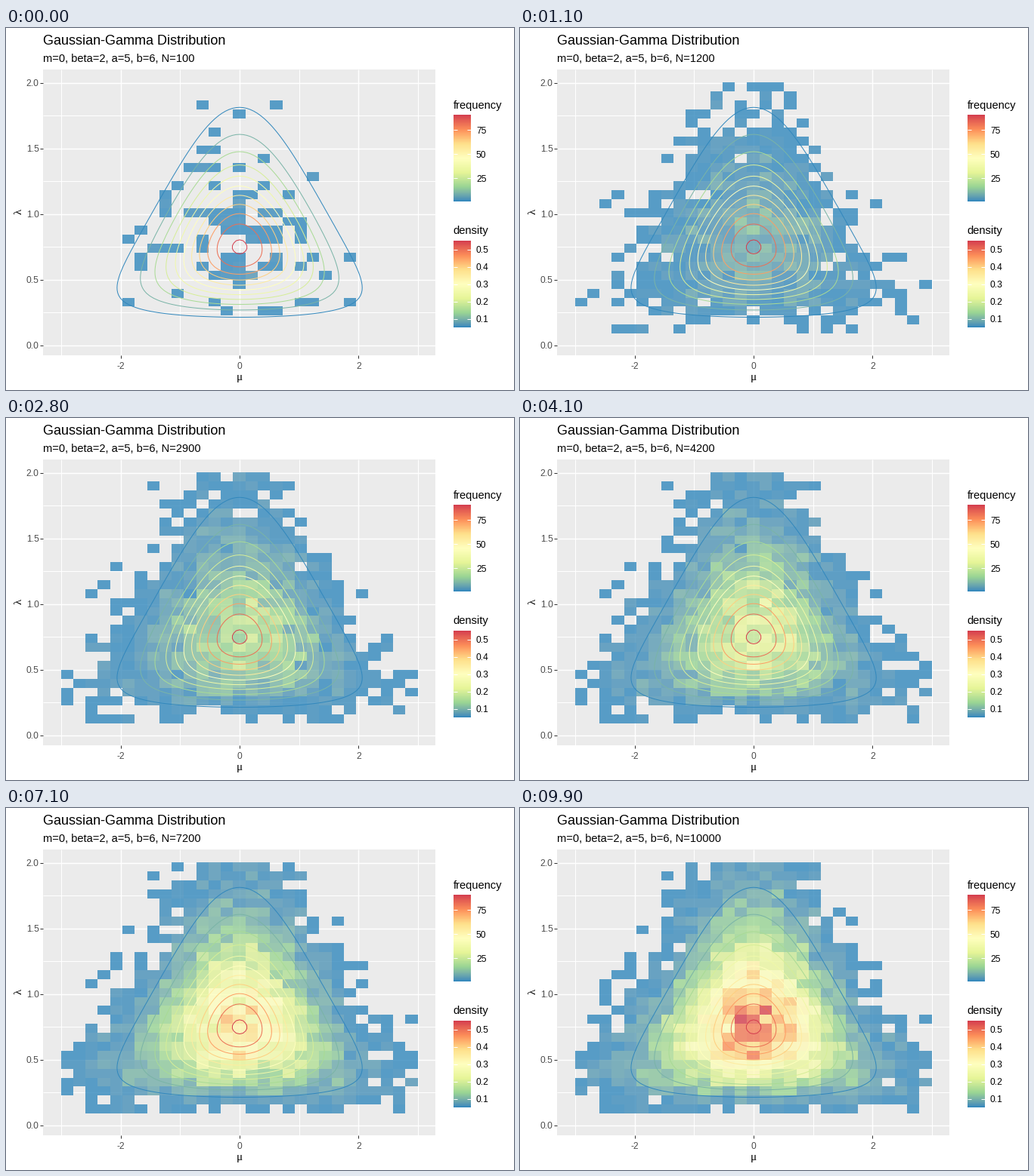
Write a matplotlib script that moves like this. It is 672 px wide and 480 px high and loops after 10000 ms.

```python
import numpy as np
import matplotlib.pyplot as plt
from matplotlib.animation import FuncAnimation
from matplotlib.colors import ListedColormap, to_rgb
from matplotlib.patches import Rectangle

W, H = 672, 480
LEFT, RIGHT, TOP, BOTTOM = 49, 568, 55, 434
STEPS, BATCH, BINS = 100, 100, 29
BETA, A, B = 2, 5, 6
MU_MAX, LAM_MIN, LAM_MAX = 3, .02, 2
PX = 0.72  # points per pixel at 100 dpi

plt.rcParams["font.family"] = "Liberation Sans"


def sx(mu):
    return 309.05 + 78.65 * mu


def sy(lam):
    return 420.9 - 174 * lam


def density(mu, lam):
    gauss = np.sqrt(BETA * lam / (2 * np.pi)) * np.exp(-BETA * lam * mu**2 / 2)
    return gauss * B**A / 24 * lam**(A - 1) * np.exp(-B * lam)


def lab_ramp(names, n=256):
    """Colour ramp blended in Lab space (cube roots of XYZ)."""
    m = np.array([[.4124, .3576, .1805], [.2126, .7152, .0722], [.0193, .1192, .9505]])
    white = m.sum(axis=1)
    rgb = np.array([to_rgb(c) for c in names])
    lin = np.where(rgb > .04045, ((rgb + .055) / 1.055)**2.4, rgb / 12.92)
    root = np.cbrt(lin @ m.T / white)
    knots, t = np.linspace(0, 1, len(names)), np.linspace(0, 1, n)
    mix = np.stack([np.interp(t, knots, root[:, k]) for k in range(3)], axis=1)
    lin = np.clip((mix**3 * white) @ np.linalg.inv(m).T, 0, 1)
    out = np.where(lin > .0031308, 1.055 * lin**(1 / 2.4) - .055, lin * 12.92)
    return ListedColormap(np.clip(out, 0, 1))


SPECTRAL = lab_ramp(["#3288BD", "#99D594", "#E6F598", "#FFFFBF",
                     "#FEE08B", "#FC8D59", "#D53E4F"])

# Draw every sample once; each step shows the first (i + 1) * BATCH of them
rng = np.random.default_rng(11)
lam_s = rng.gamma(A, 1 / B, STEPS * BATCH)
mu_s = rng.normal(0, 1 / np.sqrt(BETA * lam_s))

mu_edges = np.linspace(-MU_MAX, MU_MAX, BINS + 1)
lam_edges = np.linspace(LAM_MIN, LAM_MAX, BINS + 1)

# Tile borders on whole pixels, rows running from the top
x_px = np.floor(sx(mu_edges)).astype(int)
y_px = np.floor(sy(lam_edges[::-1])).astype(int)


def tile_pixels(i):
    n = (i + 1) * BATCH
    counts, _, _ = np.histogram2d(lam_s[:n], mu_s[:n], bins=(lam_edges, mu_edges))
    grid = counts[::-1].repeat(np.diff(y_px), axis=0).repeat(np.diff(x_px), axis=1)
    return np.ma.masked_equal(grid, 0)


fig = plt.figure(figsize=(W / 100, H / 100), dpi=100, facecolor="white")
ax = fig.add_axes([0, 0, 1, 1])
ax.axis("off")


def line(x, y, color, z, width=1):
    ax.plot(x, y, color=color, lw=width * PX, zorder=z, solid_capstyle="butt")


def label(x, y, s, size, color="black", **kw):
    return ax.text(x, y, s, fontsize=size * PX, color=color, **kw)


def colorbar(top, title, ticks):
    label(591.5, top - 8.5, title, 14.67)
    ax.imshow(np.linspace(0, 1, 256)[:, None], cmap=SPECTRAL, origin="lower",
              extent=(592, 615, top + 115, top), aspect="auto", zorder=2)
    for y, s in ticks:
        line([592, 597], [y, y], "white", 3)
        line([610, 615], [y, y], "white", 3)
        label(622, y + 4.4, s, 12)


# Panel, grid and axes
ax.add_patch(Rectangle((LEFT, TOP), RIGHT - LEFT, BOTTOM - TOP,
                       fc="#EBEBEB", ec="none", zorder=0))
for mu in range(-3, 4):
    major = mu % 2 == 0
    line([sx(mu)] * 2, [TOP, BOTTOM], "white", 1, 1.42 if major else 1)
    if major:
        line([sx(mu)] * 2, [BOTTOM, BOTTOM + 4], "#333333", 1)
        label(sx(mu), 451.5, str(mu), 12, "#4D4D4D", ha="center")
for k in range(9):
    y, major = sy(k / 4), k % 2 == 0
    line([LEFT, RIGHT], [y, y], "white", 1, 1.42 if major else 1)
    if major:
        line([LEFT - 4, LEFT], [y, y], "#333333", 1)
        label(43.5, y + 4.2, f"{k / 4:.1f}", 12, "#4D4D4D", ha="right")
label(309, 467, "μ", 15, ha="center", family="Liberation Serif")
label(24, 243.5, "λ", 15, ha="right", va="center", rotation=90,
      family="Liberation Serif")

label(49, 22, "Gaussian-Gamma Distribution", 18)
subtitle = label(49, 45, "", 14.67)

colorbar(115, "frequency", [(230 - (n - 1) * 115 / 90, str(n)) for n in (25, 50, 75)])
colorbar(282, "density", [(397 - (k - .5) * 23, f"0.{k}") for k in range(1, 6)])

# Histogram tiles and density contours
tiles = ax.imshow(tile_pixels(0), cmap=SPECTRAL, vmin=1, vmax=91, alpha=.8,
                  extent=(x_px[0], x_px[-1], y_px[-1], y_px[0]),
                  interpolation="nearest", aspect="auto", zorder=4)

mu, lam = np.meshgrid(np.linspace(-MU_MAX, MU_MAX, 101),
                      np.linspace(LAM_MIN, LAM_MAX, 100))
ax.contour(sx(mu), sy(lam), density(mu, lam), levels=np.arange(1, 12) * .05,
           colors=[SPECTRAL(k / 10) for k in range(11)],
           linewidths=PX, antialiased=True, zorder=5)

ax.set_xlim(0, W)
ax.set_ylim(H, 0)


def update(i):
    tiles.set_data(tile_pixels(i))
    subtitle.set_text(f"m=0, beta={BETA}, a={A}, b={B}, N={(i + 1) * BATCH}")
    return tiles, subtitle


anim = FuncAnimation(fig, update, frames=STEPS, interval=100, repeat=True,
                     repeat_delay=0, blit=False)
plt.show()
```
